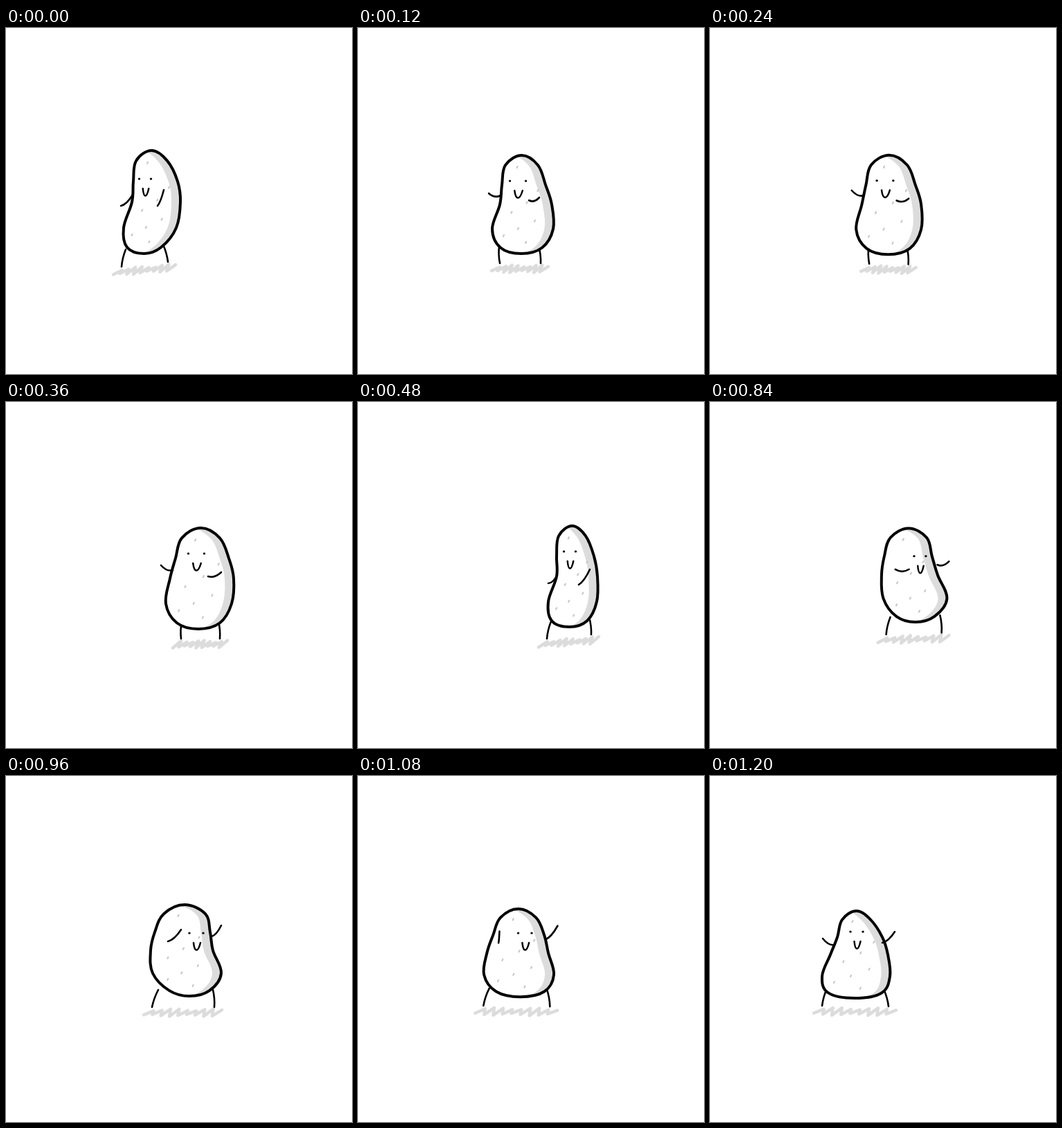
Recreate the animation shown at these times as an HTML page with a canvas. Size 500 px wide and 500 px high, loop 1.32 s.

```html
<!DOCTYPE html>
<html lang="en">
<head>
<meta charset="utf-8">
<title>Dancing potato</title>
<style>
html, body { margin: 0; width: 100%; height: 100%; overflow: hidden; background: #fff; }
canvas { display: block; }
</style>
</head>
<body>
<canvas id="stage" width="500" height="500"></canvas>
<script>
const ctx = document.getElementById('stage').getContext('2d');
const STEP = 120, STEPS = 11, GREY = '#dcdcdc';
const LEVELS = [.1, .3, .5, .75, .94]; // heights at which the body's edges are given

// span: top and bottom; left, right: edges at LEVELS; face: x, y, eye gap;
// arms: shoulder to hand; legs: hip x, then foot.
const keys = [
  { step: 0, span: [177, 326], left: [188, 184, 182, 170, 175], right: [233, 248, 252, 246, 224],
    face: [201, 218, 17], armL: [183, 241, 166, 257], armR: [228, 234, 219, 257],
    legL: [173, 167, 345], legR: [227, 234, 338] },
  { step: 1, span: [184, 326], left: [213, 208, 205, 194, 206], right: [260, 271, 280, 282, 266],
    face: [231, 221, 23], armL: [206, 242, 189, 239], armR: [262, 245, 247, 249],
    legL: [204, 205, 340], legR: [261, 264, 340] },
  { step: 3, span: [182, 328], left: [254, 245, 237, 231, 247], right: [309, 322, 329, 326, 309],
    face: [275, 219, 23], armL: [241, 243, 224, 236], armR: [311, 246, 292, 252],
    legL: [254, 253, 342], legR: [307, 309, 342] },
  { step: 4, span: [179, 325], left: [290, 287, 287, 275, 280], right: [329, 341, 346, 345, 331],
    face: [306, 216, 17], armL: [288, 250, 275, 262], armR: [335, 242, 319, 264],
    legL: [279, 273, 342], legR: [334, 337, 336] },
  { step: 6, span: [180, 319], left: [289, 285, 283, 282, 293], right: [331, 341, 353, 365, 347],
    face: [322, 218, 14], armL: [294, 246, 307, 263], armR: [352, 240, 368, 248],
    legL: [293, 290, 338], legR: [357, 360, 333] },
  { step: 8, span: [186, 318], left: [228, 215, 209, 212, 236], right: [288, 295, 299, 311, 294],
    face: [275, 227, 20], armL: [234, 239, 253, 222], armR: [297, 232, 311, 216],
    legL: [220, 211, 334], legR: [299, 301, 334] },
  { step: 10, span: [195, 321], left: [191, 184, 174, 162, 171], right: [232, 249, 257, 260, 248],
    face: [212, 225, 18], armL: [180, 244, 163, 235], armR: [249, 241, 267, 225],
    legL: [169, 162, 332], legR: [251, 258, 333] }
];

// The key pose of a step, or the middle of a smooth path through the keys around it.
function poseAt(step) {
  const k = keys.findLastIndex(key => key.step <= step);
  if (keys[k].step === step) return keys[k];
  const [a, b, c, d] = [-1, 0, 1, 2].map(i => keys[(k + i + keys.length) % keys.length]);
  const pose = {};
  for (const part in b) {
    if (part === 'step') continue;
    pose[part] = b[part].map((v, i) => (9 * (v + c[part][i]) - a[part][i] - d[part][i]) / 16);
  }
  return pose;
}
const poses = Array.from({ length: STEPS }, (_, step) => poseAt(step));

const lerp = (a, b, t) => a + (b - a) * t;

function stroke(path, width, color = '#000') {
  ctx.lineWidth = width;
  ctx.strokeStyle = color;
  ctx.stroke(path);
}

// Quadratic line whose middle control point is pushed by (dx, dy).
function bow(x0, y0, x1, y1, dx, dy) {
  const path = new Path2D();
  path.moveTo(x0, y0);
  path.quadraticCurveTo((x0 + x1) / 2 + dx, (y0 + y1) / 2 + dy, x1, y1);
  return path;
}

// Smooth closed path through every point.
function loop(pts) {
  const n = pts.length, path = new Path2D(), at = i => pts[(i + n) % n];
  path.moveTo(...pts[0]);
  for (let i = 0; i < n; i++) {
    const [a, b, c, d] = [at(i - 1), at(i), at(i + 1), at(i + 2)];
    path.bezierCurveTo(
      b[0] + (c[0] - a[0]) / 5.5, b[1] + (c[1] - a[1]) / 5.5,
      c[0] - (d[0] - b[0]) / 5.5, c[1] - (d[1] - b[1]) / 5.5, ...c);
  }
  return path;
}

function bodyPath({ span: [top, bottom], left, right }) {
  const edge = side => LEVELS.map((v, i) => [side[i], lerp(top, bottom, v)]);
  const middle = i => (left[i] + right[i]) / 2;
  return loop([[middle(0), top], ...edge(right), [middle(4), bottom], ...edge(left).reverse()]);
}

// Scribble under the feet, a little wider than the stance.
function drawGround([, x0, y0], [, x1, y1]) {
  const path = new Path2D(), turns = 17;
  for (let i = 0; i <= turns; i++) {
    const t = i / turns, side = i % 2 ? 1 : -1;
    const height = 4 + 1.5 * Math.sin(i * 7 + x0);
    path.lineTo(lerp(x0 - 8, x1 + 7, t) + side * 4, lerp(y0, y1, t) + 8 - side * height);
  }
  stroke(path, 4.5, GREY);
}

function drawSpots({ span, left, right }) {
  for (let i = 0; i < 8; i++) {
    const v = .12 + .83 * (i / 8) ** .6, u = .15 + .7 * ((.3 + i * .618) % 1);
    const hi = Math.max(1, LEVELS.findIndex(level => level > v)), lo = hi - 1;
    const t = (v - LEVELS[lo]) / (LEVELS[hi] - LEVELS[lo]);
    const x = lerp(lerp(left[lo], left[hi], t), lerp(right[lo], right[hi], t), u);
    const y = lerp(...span, v);
    stroke(bow(x - .5, y + 1, x + .5, y - 1, 0, 0), 2.2, '#c8c8c8');
  }
}

function drawFace([x, y, gap]) {
  for (const side of [-1, 1]) {
    const eye = x + side * gap / 2;
    stroke(bow(eye - .2, y, eye + .2, y, 0, 0), 3);
  }
  const mouth = new Path2D(), w = gap / 4, top = y + 14;
  mouth.moveTo(x + 1 - w, top);
  mouth.bezierCurveTo(x + 1 - w * .7, top + 14, x + 1 + w * .3, top + 14, x + 1 + w, top);
  stroke(mouth, 2.5);
}

function draw(pose) {
  ctx.fillStyle = '#fff';
  ctx.fillRect(0, 0, 500, 500);
  drawGround(pose.legL, pose.legR);
  for (const [side, [hip, x, y]] of [[-1, pose.legL], [1, pose.legR]]) {
    stroke(bow(hip, y - 25, x, y, side * 2, 0), 2.6);
  }

  // The shade is what a copy of the body, moved left, leaves uncovered.
  const body = bodyPath(pose);
  ctx.save();
  ctx.clip(body);
  ctx.fillStyle = GREY;
  ctx.fill(body);
  ctx.translate(-13, 1);
  ctx.fillStyle = '#fff';
  ctx.fill(body);
  ctx.restore();

  drawSpots(pose);
  stroke(body, 4);
  drawFace(pose.face);
  for (const arm of [pose.armL, pose.armR]) stroke(bow(...arm, 0, 6), 2.6);
}

ctx.lineCap = ctx.lineJoin = 'round';
const start = performance.now();
function tick() {
  const time = performance.now() - start;
  draw(poses[Math.floor(time / STEP) % STEPS]);
  requestAnimationFrame(tick);
}
tick();
</script>
</body>
</html>
```
